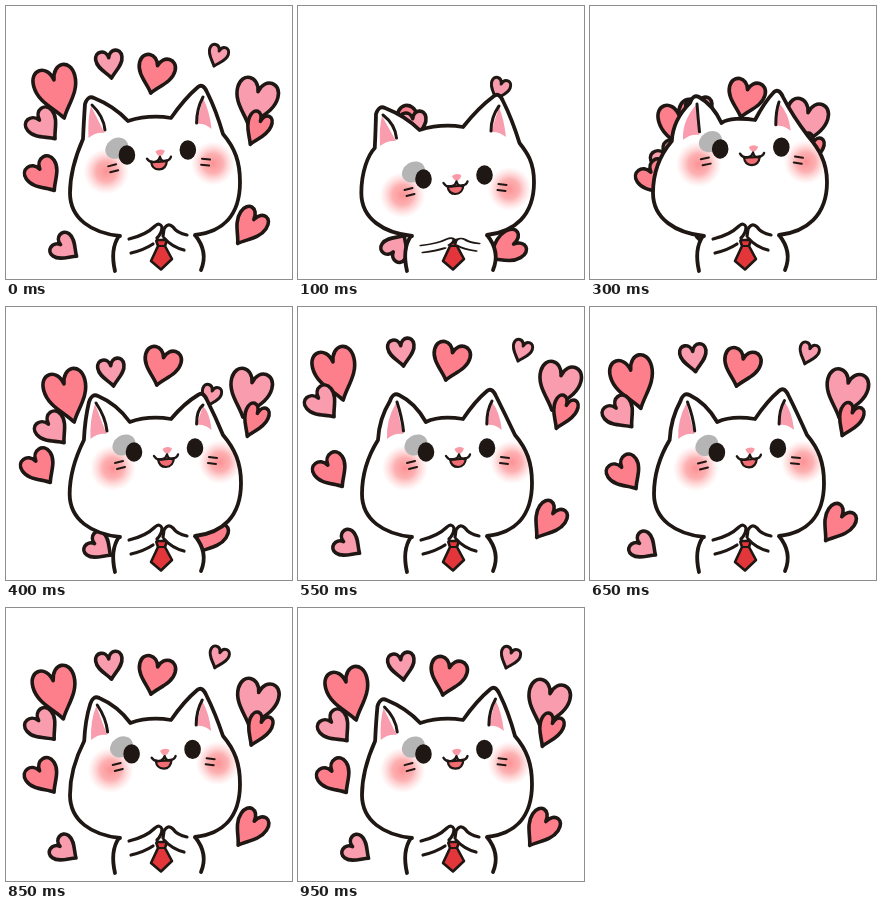
Write an HTML page with a canvas that moves like this. It is 286 by 273 pixels and loops after 1000 ms.

```html
<!DOCTYPE html>
<html lang="en">
<head>
<meta charset="utf-8">
<title>Cat with hearts</title>
<style>
html, body { margin: 0; width: 100%; height: 100%; overflow: hidden; background: #fff; }
canvas { display: block; width: 286px; height: 273px; }
</style>
</head>
<body>
<canvas id="stage"></canvas>
<script>
const W = 286, H = 273, LOOP = 1000, STEP = 50;
const INK = '#1f1714', CORAL = '#fd7f8b', PINK = '#f99dae', RED = '#e2363a';
const canvas = document.getElementById('stage');
const ctx = canvas.getContext('2d');
const dpr = window.devicePixelRatio || 1;
canvas.width = W * dpr;
canvas.height = H * dpr;

const linear = u => u;
const easeOut = u => u * (2 - u);
const easeInOut = u => u * u * (3 - 2 * u);
const mix = (a, b, u) => a + (b - a) * u;

// keys: [time, values, easing towards this key]
function sample(keys, t) {
  let i = 1;
  while (i < keys.length - 1 && t > keys[i][0]) i++;
  const [t0, a] = keys[i - 1], [t1, b, ease = linear] = keys[i];
  const u = ease(Math.min(1, Math.max(0, (t - t0) / (t1 - t0))));
  return a.map((v, k) => mix(v, b[k], u));
}

// rest, tucked, emerging, bursting and farthest tip positions
function heart(fill, w, l, angle, rest, tucked, emerging, bursting, far, spin = 0) {
  const pose = (p, turn = 0) => [p[0], p[1], angle + turn];
  return { fill, w, l, keys: [
    [0, pose(rest)],
    [100, pose(tucked, spin)],
    [200, pose([150, 178]), easeOut],
    [300, pose(emerging)],
    [400, pose(bursting)],
    [550, pose(far), easeOut],
    [950, pose(rest), easeOut]
  ] };
}

const hearts = [
  heart(CORAL, 46, 57, -15, [59, 115], [110, 156], [100, 150], [69, 118], [46, 96]),
  heart(PINK, 35, 37, -40, [51, 135], [105, 170], [92, 168], [60, 138], [38, 112]),
  heart(CORAL, 37, 39, -34, [50, 187], [115, 190], [77, 190], [46, 178], [46, 182]),
  heart(PINK, 31, 31, -54, [73, 252], [108, 227], [135, 235], [107, 250], [64, 248], -92),
  heart(PINK, 30, 32, -8, [106, 75], [118, 136], [112, 122], [108, 82], [106, 62]),
  heart(CORAL, 40, 42, 14, [144, 90], [150, 165], [150, 114], [150, 81], [147, 76]),
  heart(PINK, 23, 26, 19, [207, 63], [197, 96], [185, 130], [200, 102], [219, 57]),
  heart(PINK, 45, 52, 15, [242, 123], [185, 160], [208, 144], [236, 113], [253, 106]),
  heart(CORAL, 27, 38, 24, [243, 141], [190, 170], [211, 163], [240, 132], [257, 124]),
  heart(CORAL, 34, 43, 34, [230, 240], [188, 254], [165, 235], [190, 248], [237, 233], 26)
];

// left ear tip, right ear tip, crown drop, extra width
const headKeys = [
  [0, [84, 91, 196, 79, 0, 0]],
  [100, [83, 101, 200, 88, 9, 2]],
  [300, [105, 90, 188, 84, 2, 3], easeInOut],
  [400, [88, 88, 196, 86, 0, 1]],
  [550, [97, 87, 193, 82, 0, 0]],
  [750, [94, 87, 194, 81, 0, 0]],
  [950, [84.5, 91, 196.5, 79, 0, 0]]
];

// face offset, tilt, hand squash
const faceKeys = [
  [0, [-7, 3.5, -1, 0]],
  [100, [-2.5, 28, 0, 1]],
  [300, [2, -1, 2, 0], easeInOut],
  [400, [0, 0, 0, 0]],
  [550, [0, 0, 0, 0]],
  [950, [-2.5, 0.7, -0.5, 0], easeOut]
];

function paint(d, fill, width, transform) {
  const path = new Path2D(d);
  if (fill) { ctx.fillStyle = fill; ctx.fill(path); }
  if (width) { ctx.lineWidth = width; ctx.stroke(path); }
}

function oval(x, y, rx, ry, turn, fill) {
  ctx.fillStyle = fill;
  ctx.beginPath();
  ctx.ellipse(x, y, rx, ry, turn, 0, Math.PI * 2);
  ctx.fill();
}

function blush(x, y, r) {
  const g = ctx.createRadialGradient(x, y, 0, x, y, r);
  g.addColorStop(0, 'rgba(252,140,143,.95)');
  g.addColorStop(0.45, 'rgba(252,150,152,.75)');
  g.addColorStop(1, 'rgba(255,190,190,0)');
  oval(x, y, r, r, 0, g);
}

function drawHeart(h, t) {
  const [x, y, deg] = sample(h.keys, t);
  const w = (h.w - 3.5) / 2, l = h.l - 5;
  ctx.save();
  ctx.translate(x, y);
  ctx.rotate(deg * Math.PI / 180);
  ctx.translate(0, -3);
  ctx.beginPath();
  ctx.moveTo(0, 0);
  ctx.bezierCurveTo(-w * 0.3, -l * 0.22, -w, -l * 0.42, -w, -l * 0.74);
  ctx.bezierCurveTo(-w, -l * 1.08, -w * 0.15, -l * 1.1, 0, -l * 0.76);
  ctx.bezierCurveTo(w * 0.15, -l * 1.1, w, -l * 1.08, w, -l * 0.74);
  ctx.bezierCurveTo(w, -l * 0.42, w * 0.3, -l * 0.22, 0, 0);
  ctx.closePath();
  ctx.fillStyle = h.fill;
  ctx.lineWidth = h.w < 26 ? 3 : 3.6;
  ctx.fill();
  ctx.stroke();
  ctx.restore();
}

function drawBody() {
  paint('M113 230C106 240 106 252 109 265L195 264C200 252 198 240 189 229Z', '#fff');
  paint('M113 230C106 240 106 252 109 265M189 229C198 240 200 252 195 264', null, 3.8);
}

function headPath([lx, ly, rx, ry, dy, w]) {
  const bx = 77 + 0.23 * (lx - 84), sx = 122 + 0.45 * (lx - 84);
  const p = new Path2D();
  p.moveTo(114, 230);
  p.bezierCurveTo(86, 227, 64 - w / 3, 213, 64 - w / 3, 187);
  p.bezierCurveTo(64 - w / 3, 166, 70, 149, bx, 133 + dy);
  p.quadraticCurveTo(bx + 1, 112 + dy, lx - 5, ly + 7);
  p.quadraticCurveTo(lx - 2, ly - 2, lx + 4, ly + 1);
  p.quadraticCurveTo((lx + sx) / 2 + 5, ly + 9, sx, 115 + dy);
  p.bezierCurveTo(138, 110 + dy, 153, 110 + dy, 165, 112 + dy);
  p.quadraticCurveTo((165 + rx) / 2 - 2, (112 + dy + ry) / 2 - 3, rx - 4, ry + 2);
  p.quadraticCurveTo(rx + 1, ry - 2, rx + 5, ry + 7);
  p.quadraticCurveTo(rx + 14, ry + 25, 217 + dy * 0.5, 128 + dy);
  p.bezierCurveTo(229, 142 + dy / 2, 234 + w, 156, 234 + w, 176);
  p.bezierCurveTo(234 + w, 210, 216, 226, 189, 229);
  return p;
}

function drawEars([lx, ly, rx, ry, dy]) {
  const a = (lx - 97) / 2, b = (rx - 195) * 0.6;
  const top = dy * 0.9;
  paint(`M${lx + 1} ${ly + 9}Q${88 + a} ${113 + top} ${89 + a} ${132 + top}Q${96 + a} ${126 + top} ${105 + a} ${127 + top}Z`, PINK);
  paint(`M${lx + 2} ${ly + 8}Q${104 + a} ${110 + top} ${105.5 + a} ${124 + top}`, null, 3);
  paint(`M${rx + 1} ${ry + 13}Q${203 + b} ${105 + top} ${205 + b} ${123 + top}Q${198 + b} ${117 + top} ${190 + b} ${118 + top}Z`, PINK);
  paint(`M${rx + 1} ${ry + 12}Q${190 + b} ${103 + top} ${190 + b} ${117 + top}`, null, 3);
}

function drawFace([fx, fy, tilt]) {
  ctx.translate(158 + fx, 150 + fy);
  ctx.rotate(tilt * Math.PI / 180);
  ctx.translate(-158, -150);
  blush(107, 161, 23);
  blush(214, 155, 22);
  oval(118, 138, 12, 10, -0.55, '#b5b5b6');
  oval(128, 145, 8.3, 9.7, 0, INK);
  oval(189, 141, 8.3, 9.7, 0, INK);
  paint('M156.5 142Q161 138.5 166 141.5Q164 146.5 161 147Q158 146 156.5 142Z', '#f99aa6');
  paint('M152 152Q160 153 168 151Q167 160 160 160Q153 160 152 152Z', '#f26d73', 2.2);
  paint('M148 149Q151 154 157 152Q160 151 161 147.5Q162 152 166 152Q171 151 172 147.5', null, 2.4);
  paint('M109 156L117 154M111 162L119 160M203 150L211 151M202 156L210 157', null, 2);
}

function drawHands(squash) {
  paint('M150 234L161 234L159 240L166 253L155 263.5L145 255L152 240Z', RED, 2.6);
  paint('M152 240L159 240', null, 2);
  ctx.save();
  ctx.translate(0, 246);
  ctx.scale(1, 1 - squash * 0.5);
  ctx.translate(0, -246);
  paint('M124 233Q140 229 149 220Q154 216 156 221Q156 227 150 233L147 238Z', '#fff');
  paint('M180 229Q171 227 167 221Q162 216 158 223L157 230Q164 239 178 244Z', '#fff');
  paint('M123 233Q140 229 149 220Q154 216 156 221Q156 227 151 232M125 247Q138 244 147 238', null, 3.2);
  paint('M181 229Q171 227 167 221Q162 216 158 223L157 230M158 232Q166 241 178 244', null, 3.2);
  ctx.restore();
}

function draw(t) {
  ctx.setTransform(dpr, 0, 0, dpr, 0, 0);
  ctx.fillStyle = '#fff';
  ctx.fillRect(0, 0, W, H);
  ctx.strokeStyle = INK;
  ctx.lineCap = ctx.lineJoin = 'round';

  const head = sample(headKeys, t), face = sample(faceKeys, t);
  hearts.forEach(h => drawHeart(h, t));
  drawBody();

  const outline = headPath(head);
  ctx.fillStyle = '#fff';
  ctx.fill(outline);
  ctx.save();
  ctx.clip(outline);
  drawEars(head);
  drawFace(face);
  ctx.restore();
  ctx.lineWidth = 3.8;
  ctx.stroke(outline);
  drawHands(face[3]);
}

const start = performance.now();
function tick() {
  const ms = (performance.now() - start) % LOOP;
  draw(Math.floor(ms / STEP) * STEP);
  requestAnimationFrame(tick);
}
tick();
</script>
</body>
</html>
```
